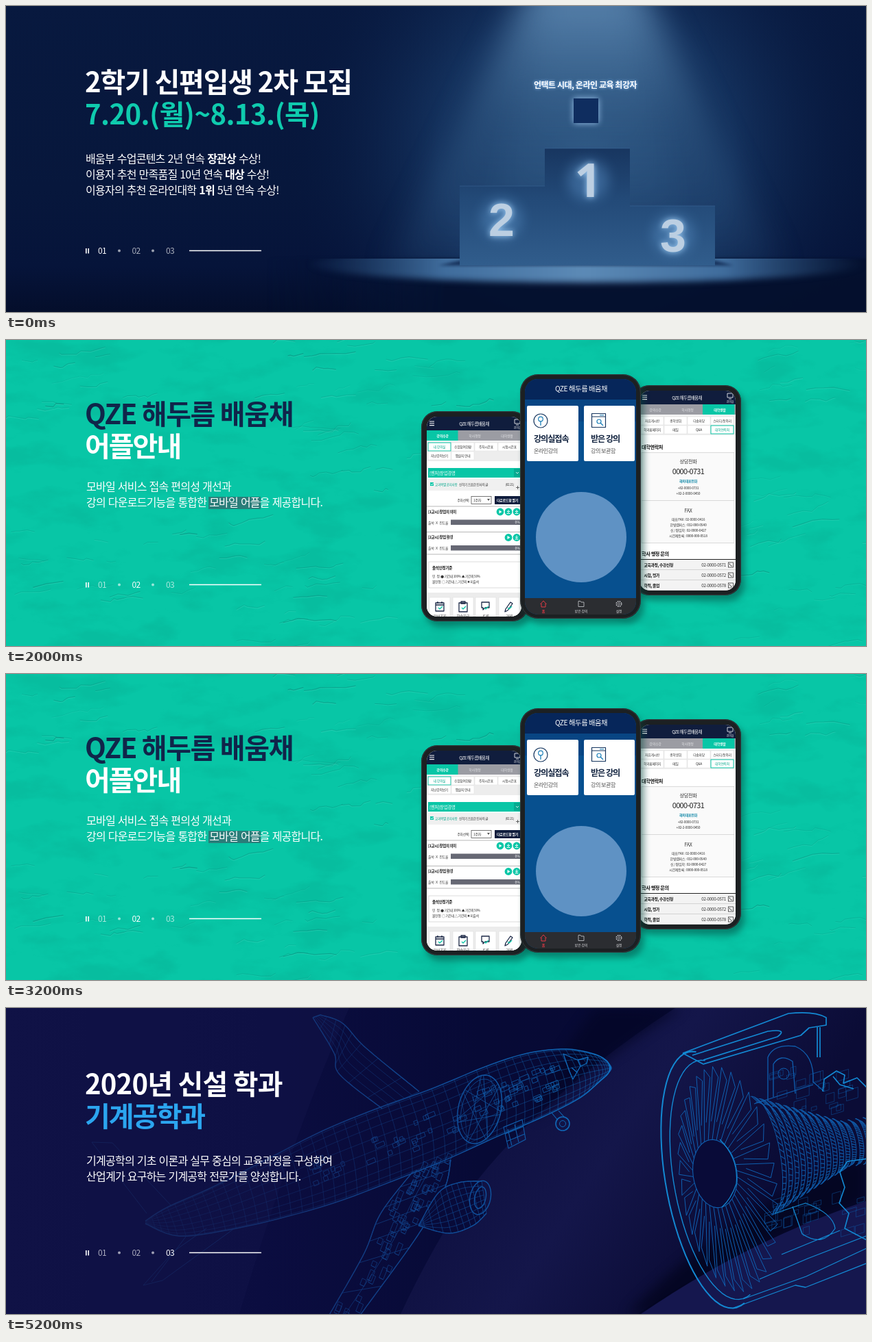
These frames come from a looping animation (1253x447 px, 6000 ms). An HTML page:

```html
<!DOCTYPE html>
<html>
<head>
<meta charset="utf-8">
<title>Banner</title>
<style>
html, body { margin: 0; width: 100%; height: 100%; overflow: hidden; background: #07193f; }
svg { display: block; width: 100vw; height: 100vh; }
text { font-family: "Noto Sans CJK KR", "Noto Sans CJK JP", sans-serif; white-space: pre; }
.num { font-family: "Liberation Sans", Arial, sans-serif; }
.one { font-family: "Open Sans", sans-serif; }
</style>
</head>
<body>
<svg id="stage" viewBox="0 0 1253 447" xmlns="http://www.w3.org/2000/svg"></svg>
<script>
const NAVY = '#101d3d', TEAL = '#08c6a6', INK = '#333';

// Markup helpers
const attrs = o => Object.entries(o).map(([k, v]) => ` ${k}="${v}"`).join('');
const tag = (name, o, inner = '') => `<${name}${attrs(o)}>${inner}</${name}>`;
const rect = (x, y, width, height, fill, o = {}) => tag('rect', { x, y, width, height, fill, ...o });
const circle = (cx, cy, r, fill, o = {}) => tag('circle', { cx, cy, r, fill, ...o });
const shape = (d, fill, o = {}) => tag('path', { d, fill, ...o });
const line = (d, stroke, w = 1, o = {}) =>
  tag('path', { d, fill: 'none', stroke, 'stroke-width': w, 'stroke-linejoin': 'round', ...o });
const text = (x, y, s, size, fill, weight = 400, ls = 0, anchor = 'start', o = {}) =>
  tag('text', { x, y, fill, 'font-size': size, 'font-weight': weight, 'letter-spacing': ls, 'text-anchor': anchor, ...o }, s);
const mid = (x, y, s, size, fill, weight = 400, ls = -size * .05) => text(x, y, s, size, fill, weight, ls, 'middle');
const group = (inner, o = {}) => tag('g', o, inner);
const stops = list => list.map(([offset, c, a = 1]) => tag('stop', { offset, 'stop-color': c, 'stop-opacity': a })).join('');
const linear = (id, x1, y1, x2, y2, list) =>
  tag('linearGradient', { id, gradientUnits: 'userSpaceOnUse', x1, y1, x2, y2 }, stops(list));
const radial = (id, cx, cy, r, list) =>
  tag('radialGradient', { id, gradientUnits: 'userSpaceOnUse', cx, cy, r }, stops(list));
const blur = (id, n) => tag('filter', { id, x: '-50%', y: '-50%', width: '200%', height: '200%', 'color-interpolation-filters': 'sRGB' },
  `<feGaussianBlur stdDeviation="${n}"/>`);
const clip = (id, inner) => tag('clipPath', { id }, inner);

// Geometry helpers
const rng = seed => () => (seed = (seed * 16807) % 2147483647) / 2147483647;
const lerp = (a, b, t) => a + (b - a) * t;
const mix = (p, q, t) => [lerp(p[0], q[0], t), lerp(p[1], q[1], t)];
const range = (n, f) => Array.from({ length: n }, (_, i) => f(i));
const at = p => p.map(v => v.toFixed(1)).join(' ');
const poly = (pts, close = '') => 'M' + pts.map(at).join('L') + close;
const ell = (cx, cy, rx, ry, deg) => a => {
  const r = deg * Math.PI / 180, u = rx * Math.cos(a), v = ry * Math.sin(a);
  return [cx + u * Math.cos(r) - v * Math.sin(r), cy + u * Math.sin(r) + v * Math.cos(r)];
};
const arc = (e, a, b, n = 40) => poly(range(n + 1, i => e(lerp(a, b, i / n))));
const spline = pts => t => {
  const s = Math.min(t, .99999) * (pts.length - 1), i = Math.floor(s), f = s - i;
  const [a, b, c, d] = [-1, 0, 1, 2].map(k => pts[Math.max(0, Math.min(pts.length - 1, i + k))]);
  return [0, 1].map(k => b[k] + .5 * f * (c[k] - a[k] + f * (2 * a[k] - 5 * b[k] + 4 * c[k] - d[k]
    + f * (3 * (b[k] - c[k]) + d[k] - a[k]))));
};

const defs = () => tag('defs', {},
  blur('b2', 2) + blur('b5', 5) + blur('b9', 9) + blur('b22', 22) +
  linear('night', 0, 0, 0, 447, [[0, '#08193f'], [.6, '#07173c'], [.85, '#06143a'], [1, '#040e2b']]) +
  radial('haze', 845, 210, 430, [[0, '#28527f', .85], [.5, '#1c4272', .6], [1, '#081c45', 0]]) +
  linear('beam', 0, 0, 0, 380, [[0, '#6c9bc4', .62], [.45, '#46759f', .32], [1, '#34628f', .16]]) +
  linear('floor', 380, 0, 640, 0, [[0, '#04102e', 0], [1, '#04102e', .95]]) +
  linear('lit', 430, 0, 1253, 0, [[0, '#2b5585', 0], [.25, '#3f6c9c'], [.5, '#5c8ab6'], [.75, '#3f6c9c'], [1, '#2b5585', 0]]) +
  linear('block', 0, 205, 0, 379, [[0, '#17355f'], [.45, '#234a78'], [1, '#315d8c']]) +
  linear('plane', 200, 0, 880, 0, [[0, '#14265f'], [.35, '#123274'], [.65, '#0f4a95'], [1, '#0f74c6']]) +
  linear('sky', 0, 0, 1253, 0, [[0, '#0e1043'], [.3, '#0b0d40'], [.55, '#070a36'], [1, '#080a30']]) +
  linear('sweep', 700, 100, 1050, 330, [[0, '#0e1040'], [.5, '#14164a'], [1, '#0b0c36']]) +
  clip('ground', rect(0, 369, 1253, 78, '#000')) +
  clip('scrL', rect(613, 112, 138, 292, '#000', { rx: 15 })) +
  clip('scrR', rect(923, 74, 140, 292, '#000', { rx: 15 })) +
  clip('scrC', rect(756, 57, 162, 344, '#000', { rx: 19 })) +
  tag('filter', { id: 'wall', x: 0, y: 0, width: 1, height: 1, 'color-interpolation-filters': 'sRGB' },
    '<feTurbulence type="fractalNoise" baseFrequency=".012 .026" numOctaves="6" seed="8"/>' +
    '<feColorMatrix values="0 0 0 0 0  0 0 0 0 .5  0 0 0 0 .43  4 0 0 0 -1.9"/>'));

// Shared slide controls
function pager(current) {
  const nums = range(3, i => text(134 + i * 49.5, 361.5, '0' + (i + 1), 12, '#fff', i === current ? 500 : 300, -.6,
    'start', { opacity: i === current ? 1 : .65 })).join('');
  return rect(116, 354, 1.6, 7.5, '#fff') + rect(119.4, 354, 1.6, 7.5, '#fff') + nums +
    circle(165, 357.5, 2, '#fff', { opacity: .6 }) + circle(214, 357.5, 2, '#fff', { opacity: .6 }) +
    rect(267, 356.7, 105, 1.5, '#fff');
}
const title = (y, s, fill, ls) => text(115, y, s, 40, fill, 700, ls);
const body = (x, y, s, weight = 400) => text(x, y, s, 16, '#fff', weight, -.75, 'start', { 'word-spacing': 1 });
const bold = s => `<tspan font-weight="700">${s}</tspan>`;

function award() {
  const podium = 'M661 263H785V208H909V292H1033V379H661Z';
  const digit = (x, y, s, face = 'num') => {
    const o = { class: face };
    return circle(x, y - 25, 30, '#5b92c8', { opacity: .45, filter: 'url(#b9)' }) +
      text(x, y, s, 68, '#9fcdf5', 700, 0, 'middle', { ...o, filter: 'url(#b5)' }) +
      text(x, y, s, 68, '#bccfe2', 700, 0, 'middle', o);
  };
  const slogan = (fill, o) => text(844, 120, '언택트 시대, 온라인 교육 최강자', 12, fill, 700, -.45, 'middle', o);
  return rect(0, 0, 1253, 447, 'url(#night)') +
    rect(0, 0, 1253, 447, 'url(#haze)') +
    shape('M768 -40H922L1130 385H555Z', 'url(#beam)', { filter: 'url(#b22)' }) +
    shape('M795 -40H898L985 300H705Z', 'url(#beam)', { filter: 'url(#b22)', opacity: .45 }) +
    rect(380, 369, 1000, 120, 'url(#floor)', { filter: 'url(#b2)' }) +
    group(tag('ellipse', { cx: 848, cy: 377, rx: 405, ry: 27, fill: 'url(#lit)', filter: 'url(#b5)' }), { 'clip-path': 'url(#ground)' }) +
    shape('M630 379L661 372H1033L1060 379Z', '#0a2048', { opacity: .8, filter: 'url(#b2)' }) +
    shape(podium, 'url(#block)') +
    line('M661 263H785M785 208H909M909 292H1033', '#4a78a8', .6, { opacity: .6 }) +
    digit(848, 279, '1', 'one') + digit(722, 336, '2') + digit(972, 359, '3') +
    slogan('#8cc4ff', { filter: 'url(#b2)' }) + slogan('#fff') +
    rect(827, 135, 36, 36, '#9cc4ec', { filter: 'url(#b5)' }) + rect(827, 135, 36, 36, '#0f2d5f') +
    title(126, '2학기 신편입생 2차 모집', '#fff', -1.2) +
    title(173, '7.20.(월)~8.13.(목)', '#0fcbae', -.55) +
    body(116, 229, `배움부 수업콘텐츠 2년 연속 ${bold('장관상')} 수상!`) +
    body(116, 252, `이용자 추천 만족품질 10년 연속 ${bold('대상')} 수상!`) +
    body(116, 275, `이용자의 추천 온라인대학 ${bold('1위')} 5년 연속 수상!`) +
    pager(0);
}

function plaster() {
  const rand = rng(4127);
  const spots = [[470, 45], [520, 90], [330, 325], [90, 330], [1160, 400], [1180, 45], [40, 60], [540, 180], [440, 400], [1150, 250]];
  const cracks = range(120, i => {
    const [sx, sy] = spots[i % spots.length];
    let x = sx + (rand() - .5) * 260, y = sy + (rand() - .5) * 110;
    const pts = range(3 + Math.floor(rand() * 6), () => [x += 3 + rand() * 13, y += (rand() - .65) * 8]);
    const w = .4 + rand() * 1.1;
    return line(poly(pts.map(p => [p[0], p[1] + 1])), '#4be0c6', w, { opacity: .3 }) +
      line(poly(pts), '#078f7d', w, { opacity: .2 + rand() * .4 });
  }).join('');
  return rect(0, 0, 1253, 447, TEAL) + rect(0, 0, 1253, 447, TEAL, { filter: 'url(#wall)', opacity: .12 }) + cracks;
}

function phone(x, y, w, h, r, id, screen) {
  return rect(x + 5, y + 8, w, h, '#04493f', { rx: r, opacity: .5, filter: 'url(#b5)' }) +
    rect(x, y, w, h, '#1c2022', { rx: r }) +
    rect(x + .7, y + .7, w - 1.4, h - 1.4, 'none', { rx: r, stroke: '#3c4346', 'stroke-width': .8 }) +
    group(screen, { 'clip-path': `url(#${id})` });
}

function appTop(x, y, active, menu, picked) {
  let s = rect(x - 2, y, 142, 292, '#fff') + rect(x - 2, y, 142, 20, NAVY) +
    line(`M${x + 4} ${y + 7}h7m-7 2.8h7m-7 2.8h7`, '#fff', 1.1) +
    mid(x + 69, y + 12.5, 'QZE 해두름배움채', 6.4, '#fff', 500, -.55) +
    line(`M${x + 128} ${y + 4}h8v6h-8zm2 8h4`, '#fff', .8) +
    mid(x + 132, y + 18, '강의실', 4, '#fff') +
    rect(x - 2, y + 20, 142, 15, '#9b9ca3') + rect(x + active * 46.5 - 1, y + 20, 46.5, 15, TEAL) +
    ['강의수강', '학사행정', '대학생활'].map((v, i) => mid(x + 23 + i * 47, y + 30, v, 5, i === active ? '#fff' : '#dfe0e3', i === active ? 700 : 400)).join('') +
    rect(x - 2, y + 36, 142, 29, '#ededed');
  menu.forEach((v, i) => {
    const cx = x + 2 + (i % 4) * 34, cy = y + 38 + Math.floor(i / 4) * 13, on = i === picked;
    s += rect(cx, cy, 33, 12, '#fff', { stroke: on ? TEAL : '#ddd', 'stroke-width': on ? 1 : .5 }) +
      mid(cx + 16.5, cy + 8, v, 4.8, on ? '#05a78c' : INK);
  });
  return s;
}

function lesson(y, name, icons) {
  return line(`M613 ${y - 8}h140`, '#999', .7) + text(615, y + 1.5, name, 5.4, '#111', 700, -.3) +
    icons.map(x => circle(x, y, 5.4, TEAL) + (x < 735 && x === icons[0]
      ? shape(`M${x - 1.5} ${y - 2.6}l4 2.6-4 2.6z`, '#fff')
      : line(`M${x} ${y - 3}v4m-2-2l2 2 2-2m-4.5 3.5h5`, '#fff', 1))).join('') +
    text(615, y + 17.5, '출석 : X   진도율', 4.8, INK, 400, -.2) +
    rect(648, y + 11.5, 104, 7.5, '#666874') + text(749, y + 17.3, '0%', 5, '#fff', 400, 0, 'end');
}

function leftScreen() {
  const card = (x, label, icon) => rect(x, 376, 30, 34, '#fff', { stroke: '#ddd', 'stroke-width': .6 }) +
    line(icon, '#1b2745', 1.3) + line(`M${x + 13} 391l2 2 4-4`, TEAL, 1.3) + mid(x + 15, 406, label, 5.5, INK);
  return appTop(613, 112, 0, ['내 강의실', '수업참여현황', '주차시간표', '시험시간표', '지난강의보기', '맵살지 안내'], 0) +
    rect(615, 187, 140, 14, TEAL) + text(617, 196.5, '[벤처]창업경영', 6.4, '#fff', 500, -.25) +
    rect(740, 188, 12, 12, '#06ab91') + line('M743 193l2 2 2-2', '#fff', .8) +
    rect(615, 203, 140, 17, '#f0f0f0') + rect(618, 208, 5, 5, TEAL) + line('M619 210l1.5 2 2-3', '#fff', .8) +
    text(625, 213, '교과목별 공지사항', 4.7, '#05a78c', 400, -.35) + text(660, 213, '신학기 즈음한 인사의 글', 4.7, INK, 400, -.3) +
    text(740, 213, '(02.21)', 4.6, INK, 400, -.3, 'end') + line('M743 215.5h5m-2.5-2.5v5', INK, .7) +
    text(676, 235.5, '주차선택 :', 4.8, INK, 400, -.25, 'end') +
    rect(678, 228.5, 29, 11, '#fff', { stroke: '#555', 'stroke-width': .8 }) + text(681, 235.8, '1주차', 5, INK, 400, -.3) +
    shape('M701 232h4l-2 3z', '#555') + rect(712, 228, 40, 12, NAVY) + text(715, 235.8, '다운로드함 열기', 5, '#fff', 700, -.3) +
    lesson(251, '[1교시] 창업의 의미', [720, 732, 744]) + lesson(288.5, '[2교시] 창업 환경', [732, 744]) +
    line('M613 313h140', '#999', .7) +
    rect(616, 324, 140, 38, '#fff', { stroke: '#ccc', 'stroke-width': .7 }) +
    text(621, 335, '출석인정기준', 5.6, '#111', 700, -.3) +
    text(621, 347, '인   정: ● 기간내 100% ▲ 기간외 50%', 4.8, INK, 400, -.3) +
    text(621, 354.5, '불인정: ○ 기간내 △ 기간외 ✖ 미출석', 4.8, INK, 400, -.3) +
    rect(611, 369, 142, 36, '#ececec') +
    card(617, '강의공지', 'M626 384h12v12h-12zm0 3h12m-9-5v3m6-3v3') +
    card(651, '학습자료', 'M660 384h12v13h-12zm3-2h6v3h-6z') +
    card(684, '토론', 'M693 383h11v8h-6l-3 3v-3h-2z') + card(718, '과제', 'M728 393l7-10 3 2-7 10-4 2z');
}

function rightScreen() {
  const row = (y, name, no) => rect(923, y, 142, 14.5, '#f3f3f3') + line(`M923 ${y + 14.5}h140`, '#bbb', .6) +
    text(929.5, y + 9.6, name, 5.8, '#111', 700, -.35) + text(1049, y + 9.8, no, 6.3, INK, 400, -.3, 'end') +
    rect(1052.5, y + 4, 7, 7, '#fff', { stroke: INK, 'stroke-width': .8 }) + line(`M1054.5 ${y + 5.5}v1.5l2 2h1.5`, INK, 1);
  return appTop(923, 74, 2, ['자유게시판', '총학생회', '다솜마당', '스터디/동아리', '학과홈페이지', '메일', 'Q&amp;A', '대학연락처'], 7) +
    text(926, 159, '대학연락처', 7.2, '#111', 700, -.4) +
    rect(926, 164.5, 135, 132, '#fafafa', { stroke: '#ccc', 'stroke-width': .7 }) +
    mid(994, 180, '상담전화', 7.2, INK) + mid(994, 196, '0000-0731', 11, '#222', 500, -.7) +
    mid(994, 208, '해외대표전화', 5, '#1288a8', 700) + mid(994, 218, '+82-0000-0731', 5, INK) + mid(994, 225.5, '+82-2-0000-0450', 5, INK) +
    line('M926 234.5h135', '#ccc', .7) + mid(994, 252, 'FAX', 7, INK) +
    ['대표 FAX : 02-0000-0416', '한빛캠퍼스 : 032-000-0540', '신 / 편입학 : 02-0000-0427', '시간제등록 : 0000-000-0518']
      .map((s, i) => mid(994, 263.5 + i * 8, s, 5, INK, 500)).join('') +
    text(926, 315, '학사 행정 문의', 7.2, '#111', 700, -.4) + line('M923 320.5h140', '#222', 1) +
    row(321, '교육과정, 수강신청', '02-0000-0571') + row(336, '시험, 평가', '02-0000-0572') + row(351, '학적, 졸업', '02-0000-0578');
}

function mainScreen() {
  const tile = (x, w, name, note) => rect(x, 96, w, 81, '#fff', { rx: 2 }) +
    text(x + 10, 149, name, 12.2, '#12233f', 700, -1.1) + text(x + 10, 164.5, note, 8.2, '#555', 400, -.6);
  return rect(756, 57, 162, 344, '#07508f') + rect(756, 57, 162, 30, '#06265a') + rect(756, 87, 162, 32, '#0a3a78', { opacity: .5 }) +
    mid(838, 75, 'QZE 해두름 배움채', 10.3, '#fff', 400, -.45) +
    tile(759, 75, '강의실접속', '온라인강의') + tile(842, 74, '받은 강의', '강의 보관함') +
    circle(779, 118, 10, 'none', { stroke: '#16365f', 'stroke-width': 1.2 }) +
    circle(779, 115.5, 3.3, 'none', { stroke: '#1b7fb8', 'stroke-width': 1.2 }) + line('M779 119v6', '#1b7fb8', 1.3) +
    line('M853.5 107.5h20v20h-20zm0 4.5h20', '#16365f', 1.2) + line('M865 109.8h6', '#1b7fb8', 1) +
    circle(864, 119, 3, 'none', { stroke: '#1b7fb8', 'stroke-width': 1.2 }) + line('M866 121l4 4', '#1b7fb8', 1.4) +
    circle(838, 288, 66, '#5f92c4') +
    rect(756, 377, 162, 24, '#2b2d31') +
    line('M778.5 386l4.5-5 4.5 5m-7.5-1v5h6v-5', '#e23a45', 1) + mid(783, 398, '홈', 5, '#e23a45', 700) +
    line('M834 389.5v-8h3l1 1.5h4v6.5z', '#b9bbc0', .9) + mid(838, 398, '받은 강의', 5, '#d5d6d9') +
    circle(893, 385.5, 3.8, 'none', { stroke: '#b9bbc0', 'stroke-width': 1.4, 'stroke-dasharray': '2 1' }) +
    circle(893, 385.5, 1.6, 'none', { stroke: '#b9bbc0', 'stroke-width': .8 }) + mid(893, 398, '설정', 5, '#d5d6d9');
}

function app() {
  return plaster() +
    phone(605, 104, 156, 307, 23, 'scrL', leftScreen()) + phone(914, 66, 157, 307, 23, 'scrR', rightScreen()) +
    phone(749, 50, 176, 357, 26, 'scrC', mainScreen()) +
    title(123, 'QZE 해두름 배움채', '#10254a', -1.35) + title(170, '어플안내', '#fff', -2) +
    body(117, 220, '모바일 서비스 접속 편의성 개선과', 500) + rect(295, 229, 76, 18, '#2a7d79') +
    body(117, 243, '강의 다운로드기능을 통합한 모바일 어플을 제공합니다.', 500) + pager(1);
}

function airplane() {
  const rand = rng(913), ink = 'url(#plane)';
  const top = spline([[880, 87], [875, 77], [856, 67], [815, 60], [760, 66], [700, 85], [620, 118], [540, 147], [460, 180], [380, 221], [300, 262], [235, 291], [203, 311]]);
  const bottom = spline([[880, 87], [877, 96], [863, 109], [835, 132], [780, 160], [715, 188], [640, 222], [560, 254], [480, 284], [400, 307], [320, 325], [250, 333], [203, 315]]);
  const skin = (t, f) => {
    const p = mix(top(t), bottom(t), f), b = Math.sin(f * Math.PI) * (1 - t) * 12 * Math.min(1, t * 6);
    return [p[0] + b, p[1] + b * .2];
  };
  const edge = f => poly(range(70, i => f(i / 69)));
  const ribs = range(58, i => poly(range(9, j => skin((i + 1) / 60, j / 8)))).join('');
  const rails = range(9, j => edge(t => skin(t, (1 - Math.cos(Math.PI * (j + 1) / 10)) / 2))).join('');
  const cabin = range(70, () => {
    const [x, y] = skin(.3 + rand() * .4, .25 + rand() * .42), w = 4 + rand() * 9;
    return `M${at([x, y])}l${at([w, -w * .42])}l2 6l${at([-w, w * .42])}z`;
  }).join('');
  const hatch = ell(690, 148, 31, 51, 14);
  const truss = range(7, i => poly([hatch(i * .9), hatch(i * .9 + 2.6)])).join('');
  // Wings and engine pod are ruled between two edges.
  const ruled = (a, b, n, k) => range(k, j => edge(t => mix(a(t), b(t), j / (k - 1)))).join('') +
    range(n, i => poly([a(i / (n - 1)), b(i / (n - 1))])).join('');
  const far = [spline([[447, 14], [478, 66], [486, 97], [548, 147]]), spline([[458, 10], [490, 22], [524, 58], [602, 122]])];
  const near = [spline([[592, 240], [546, 300], [521, 360], [470, 450]]), spline([[648, 222], [638, 266], [598, 335], [515, 450]])];
  const parts = range(60, () => {
    const t = rand(), [x, y] = mix(near[0](t), near[1](t), .1 + rand() * .75), w = 4 + rand() * 12;
    return `M${at([x, y])}l${at([w * .4, -w])}l6 3l${at([-w * .4, w])}zl6 3`;
  }).join('');
  const pod = [spline([[693, 253], [660, 255], [630, 270], [601, 318]]), spline([[700, 300], [680, 318], [645, 329], [601, 318]])];
  const mouth = ell(691, 277, 15, 25, 12), intake = ell(691, 277, 8, 16, 12);
  return line(ribs + rails, ink, .6, { opacity: .75 }) + line(cabin + truss, ink, .8) +
    line(edge(top) + edge(bottom) + arc(hatch, 0, 6.283), ink, 1.5) +
    line(arc(ell(690, 148, 26, 45, 14), 0, 6.283), ink, .8) +
    line('M812 67L833 76 848 72 846 81 837 85 826 104 821 93ZM833 76L837 85M824 87L832 94', ink, 1.3) +
    line(ruled(...far, 9, 6), ink, .6, { opacity: .8 }) + line(edge(far[0]) + edge(far[1]) + 'M447 14L458 10', ink, 1.4) +
    line(ruled(...near, 8, 3) + parts, ink, .7) + line(edge(near[0]) + edge(near[1]), ink, 1.4) +
    shape(edge(pod[0]) + 'L' + range(20, i => at(pod[1](1 - i / 19))).join('L') + 'Z', '#080b39') +
    line(ruled(...pod, 12, 8), ink, .6) + line(edge(pod[0]) + edge(pod[1]) + arc(mouth, 0, 6.283) + arc(intake, 0, 6.283), ink, 1.4) +
    line('M725 174L752 163 757 192 732 205ZM731 177L737 201M741 170L747 196M727 184L754 173M729 195L756 184M795 153L804 164M805 150L814 160', ink, 1.1) +
    circle(811, 169, 10, 'none', { stroke: ink, 'stroke-width': 1.6 }) + circle(811, 169, 4.5, 'none', { stroke: ink }) +
    line('M240 288L155 197 125 196 205 300M292 322L245 355 200 405 228 398 330 324M262 334L212 400', ink, 1, { opacity: .7 });
}

function turbine() {
  const rand = rng(377), bright = '#1389d3', soft = '#0f5fb0', full = 6.284;
  const rim = ell(1029, 251, 68, 190, -10), lip = ell(1040, 251, 67, 177, -10);
  const tips = ell(1052, 250, 70, 166, -8), hub = ell(1033, 242, 32, 50, -8);
  // Overlapping blades with notched tips
  const fan = range(34, i => {
    const a = i / 34 * full, h = hub(a), t = tips(a + .1), u = mix(hub(a), tips(a + .25), .86);
    return `M${at(h)}L${at(t)}L${at(u)}L${at(mix(h, u, .3))}`;
  }).join('');
  const stages = range(15, i => {
    const h = lerp(88, 34, Math.min(1, i / 11)), e = ell(1100 + i * 11, 216 - i * 1.6, h * .32, h, -10), f = ell(1106 + i * 11, 216 - i * 1.6, h * .32, h * .9, -10);
    const vanes = range(26, k => poly([e(-1.5 + k * .12), f(-1.44 + k * .12)])).join('');
    return line(arc(e, -1.57, 1.57) + arc(f, -1.57, 1.57), soft, .9) + line(vanes, soft, 1.3, { opacity: .8 });
  }).join('');
  const fittings = range(46, i => {
    const x = 1105 + rand() * 140, y = i % 2 ? 85 + rand() * 65 : 265 + rand() * 60, w = 5 + rand() * 16, h = 4 + rand() * 12;
    return `M${at([x, y])}l${at([w, -w * .3])}v${h.toFixed(1)}l${at([-w, w * .3])}z`;
  }).join('');
  return line(fittings, soft, .7, { opacity: .65 }) + stages +
    line(fan, soft, 1) +
    shape(arc(hub, 0, full) + 'Z', '#090b38', { stroke: soft, 'stroke-width': 1.1 }) +
    line('M1040 192Q1068 220 1064 257Q1056 280 1043 291', bright, 1.2) +
    line(arc(rim, 1.35, 4.85), bright, 2) + line(arc(lip, 1.35, 4.85), bright, 1.4) +
    line('M986 66L1140 8Q1178 4 1195 14V25L1170 29 1158 40 1016 82 986 66M1016 76L1124 42Q1140 30 1110 34L1000 69M1182 28V72M1186 28V72', bright, 1.7) +
    line('M1110 135V72Q1118 52 1150 56Q1178 68 1176 108L1192 122M1118 130V82Q1128 66 1146 78L1150 125M1090 140L1176 112', soft, 1.3) +
    circle(1133, 96, 8, 'none', { stroke: soft }) +
    line('M1190 122L1192 104 1210 92 1222 98 1220 110 1240 102 1256 118M1205 100L1215 112 1235 118M1256 220L1226 224 1215 240 1222 262 1214 285 1228 300 1222 322 1256 340', bright, 1.6) +
    line('M1060 438L1150 405 1165 408 1256 372M1074 425L1166 392 1256 350M1098 396L1168 366 1256 332M1120 300L1165 285Q1205 300 1208 322Q1190 350 1160 330L1146 290M1130 360L1215 325', bright, 1.3);
}

function engineering() {
  return rect(0, 0, 1253, 447, 'url(#sky)') +
    shape('M0 0H500Q420 180 340 447H0Z', '#12154a', { opacity: .45 }) +
    shape('M975 0Q790 120 680 260Q620 350 575 447H920Q1060 350 1253 280V0Z', 'url(#sweep)') +
    shape('M860 0H985Q850 85 770 165Q800 70 860 0Z', '#030524', { opacity: .65, filter: 'url(#b9)' }) +
    shape('M1253 215Q1060 290 905 447H960Q1080 345 1253 285Z', '#02041c', { opacity: .75, filter: 'url(#b9)' }) +
    shape('M1253 282Q1080 340 925 447H1253Z', '#15174e') +
    airplane() + turbine() +
    title(126, '2020년 신설 학과', '#fff', -.8) + title(173, '기계공학과', '#2ba5ef', -2) +
    body(117, 229, '기계공학의 기초 이론과 실무 중심의 교육과정을 구성하여') +
    body(117, 252, '산업계가 요구하는 기계공학 전문가를 양성합니다.') + pager(2);
}

const stage = document.getElementById('stage');
stage.innerHTML = defs() + [award, app, engineering].map(f => group(f(), { class: 'slide' })).join('');
const slides = [...stage.querySelectorAll('.slide')];
const start = performance.now();

function draw() {
  const now = Math.floor(((performance.now() - start) % 6000) / 2000);
  slides.forEach((s, i) => { s.style.display = i === now ? '' : 'none'; });
  requestAnimationFrame(draw);
}
draw();
</script>
</body>
</html>
```
